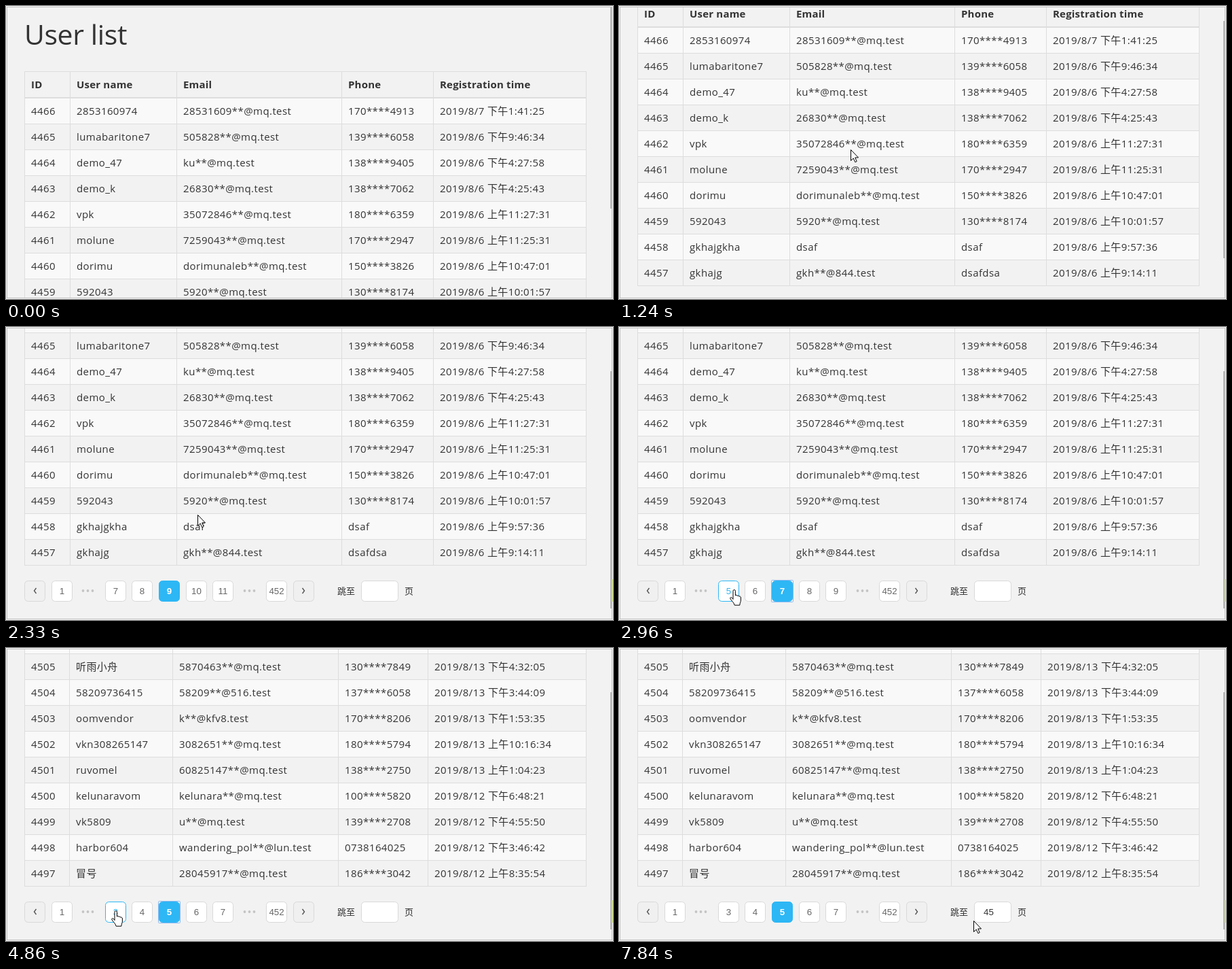
Recreate the animation shown at these times as an HTML page. Size 894 by 431 pixels, loop 8 s.

```html
<!DOCTYPE html>
<html lang="en">
<head>
<meta charset="utf-8">
<title>User list</title>
<style>
  html, body { margin: 0; width: 100%; height: 100%; overflow: hidden; background: #f2f2f2; }
  svg { display: block; width: 894px; height: 431px; }
  text { fill: #333; white-space: pre; }
  .title { font: 400 41px "Open Sans", "Noto Sans", sans-serif; letter-spacing: -.4px; }
  .cell { font: 15px "Open Sans", "Noto Sans", "Noto Sans CJK SC", "Noto Sans CJK", sans-serif; letter-spacing: .4px; }
  .head { font-weight: 700; letter-spacing: .2px; }
  .page { font: 13.33px "Liberation Sans", Arial, sans-serif; fill: #666; text-anchor: middle; }
  .label { font: 13px "Noto Sans CJK SC", "Noto Sans CJK", sans-serif; }
  .typed { font: 13.33px "Liberation Sans", Arial, sans-serif; }
  .pointer path { fill: #fff; stroke: #000; stroke-linejoin: round; }
</style>
</head>
<body>
<svg viewBox="0 0 894 431">
  <rect width="894" height="431" fill="#f2f2f2"/>
  <g id="content">
    <text class="title" x="27" y="57">User list</text>
    <g id="tables"></g>
    <g id="pager"></g>
  </g>
  <rect id="thumb" x="890" width="3" height="349" fill="#b4b4b4"/>
  <g fill="none">
    <rect x=".5" y=".5" width="893" height="430" stroke="#fafafa"/>
    <rect x="1.5" y="1.5" width="891" height="428" stroke="#c0c0c0"/>
  </g>
  <rect id="strip" x="892" width="2" height="33" fill="#d3e092"/>
  <g id="cursor" class="pointer">
    <path id="arrow" d="M.5 .5V16.5L4.2 13L6.8 18.7L9.2 17.6L6.7 12H11.5Z"/>
    <path id="hand" transform="translate(-6 0)" d="M5 14.5V2.3a1.7 1.7 0 0 1 3.4 0V9c.6-1.2 2.6-1 2.8.6c.8-1 2.4-.6 2.6.8c.9-.7 2.6-.2 2.6 1.6V16c0 2.5-1.4 3.5-1.6 7.2H7.2C6.6 19.8 3 17 1 13.8c-.9-1.6 1-2.8 2.2-1.6z"/>
    <path id="beam" style="fill:none;stroke:#333" d="M-2.5-7.5H-1L.5-6.5L2-7.5H3.5M.5-6.5V6.5M-2.5 7.5H-1L.5 6.5L2 7.5H3.5"/>
  </g>
</svg>
<script>
const LOOP = 8000, ROW = 38, BLUE = '#2db7f5', LINE = '#ddd';
const $ = id => document.getElementById(id);
const HEADINGS = ['ID', 'User name', 'Email', 'Phone', 'Registration time'];
const WIDE = [27, 94, 251, 494, 629, 854], NARROW = [27, 93, 245, 489, 621, 854];

// Each row: name, email, phone, time. An empty row stays above the visible area.
const tables = [
  { firstId: 4466, edges: WIDE, rows: [
    '2853160974,28531609**@mq.test,170****4913,8/7 下午1:41:25',
    'lumabaritone7,505828**@mq.test,139****6058,8/6 下午9:46:34',
    'demo_47,ku**@mq.test,138****9405,8/6 下午4:27:58',
    'demo_k,26830**@mq.test,138****7062,8/6 下午4:25:43',
    'vpk,35072846**@mq.test,180****6359,8/6 上午11:27:31',
    'molune,7259043**@mq.test,170****2947,8/6 上午11:25:31',
    'dorimu,dorimunaleb**@mq.test,150****3826,8/6 上午10:47:01',
    '592043,5920**@mq.test,130****8174,8/6 上午10:01:57',
    'gkhajgkha,dsaf,dsaf,8/6 上午9:57:36',
    'gkhajg,gkh**@844.test,dsafdsa,8/6 上午9:14:11'] },
  { firstId: 4486, edges: WIDE, rows: ['',
    'pelor308,6402718**@mq.test,137****5204,8/10 下午5:20:46',
    'nuvo_61,nuv**@mq.test,158****6017,8/10 下午3:08:12',
    '7302958416,73029584**@mq.test,133****9471,8/10 下午1:36:50',
    'kelimar,902641**@mq.test,181****3850,8/9 下午8:15:27',
    'tosuba92,tosub**@mq.test,139****7246,8/9 下午4:51:03',
    'ruvane,5086273**@mq.test,150****1638,8/9 上午11:42:19',
    'fomilo,38150**@mq.test,176****0925,8/8 下午6:33:08',
    'zedaku5,zeda**@mq.test,132****4780,8/8 下午2:05:41',
    'bonari,7194036**@mq.test,185****2369,8/8 上午9:27:34'] },
  { firstId: 4506, edges: NARROW, rows: ['',
    '听雨小舟,5870463**@mq.test,130****7849,8/13 下午4:32:05',
    '58209736415,58209**@516.test,137****6058,8/13 下午3:44:09',
    'oomvendor,k**@kfv8.test,170****8206,8/13 下午1:53:35',
    'vkn308265147,3082651**@mq.test,180****5794,8/13 上午10:16:34',
    'ruvomel,60825147**@mq.test,138****2750,8/13 上午1:04:23',
    'kelunaravom,kelunara**@mq.test,100****5820,8/12 下午6:48:21',
    'vk5809,u**@mq.test,139****2708,8/12 下午4:55:50',
    'harbor604,wandering_pol**@lun.test,0738164025,8/12 下午3:46:42',
    '冒号,28045917**@mq.test,186****3042,8/12 上午8:35:54'] }
];

const rect = (x, y, w, h, fill, extra = '') =>
  `<rect x="${x}" y="${y}" width="${w}" height="${h}" fill="${fill}" ${extra}/>`;
const text = (x, y, cls, value, extra = '') =>
  `<text x="${x}" y="${y}" class="${cls}" ${extra}>${value}</text>`;

function tableMarkup({ firstId, edges, rows }) {
  const cells = (values, y, cls) => values.map((v, i) => text(edges[i] + 10, y, cls, v)).join('');
  let out = cells(HEADINGS, 121, 'cell head');
  rows.forEach((row, i) => {
    const top = 136 + ROW * i;
    if (i % 2 === 0) out += rect(27, top, 827, 37, '#f9f9f9');
    out += rect(27, top + 37, 828, 1, LINE);
    if (!row) return;
    const [name, email, phone, time] = row.split(',');
    out += cells([firstId - i, name, email, phone, '2019/' + time], top + 24, 'cell');
  });
  out += rect(27, 96, 828, 1, LINE) + rect(27, 134, 828, 2, LINE);
  return out + edges.map(x => rect(x, 96, 1, 420, LINE)).join('');
}

const PAGER_TOP = 538, SIZE = 30;
const slotX = i => Math.round(27 + 39.6 * i);

function pagerMarkup(current, hovered, focused, input) {
  const slots = ['‹', 1, '…', -2, -1, 0, 1, 2, '…', 452, '›'];
  let out = '';
  slots.forEach((slot, i) => {
    const x = slotX(i), mid = x + 15.5, midY = PAGER_TOP + 15;
    if (slot === '…') {
      for (const dx of [-7, 0, 7]) out += `<circle cx="${mid - 1 + dx}" cy="${midY}" r="1.9" fill="#c4c4c4"/>`;
      return;
    }
    const inner = i >= 3 && i <= 7, active = i === 5, arrow = i === 0 || i === 10;
    const fill = active ? BLUE : arrow ? '#f0f0f0' : '#fff';
    const border = active || i === hovered ? BLUE : '#d9d9d9';
    out += rect(x + .5, PAGER_TOP + .5, SIZE, SIZE, fill, `rx="5" stroke="${border}"`);
    if (i === focused) out += rect(x - .5, PAGER_TOP - .5, SIZE + 2, SIZE + 2, 'none', 'rx="1" stroke="#8ab8f0"');
    if (arrow) {
      const d = i ? 2 : -2;
      out += `<path d="M${mid - d} ${midY - 4}L${mid + d / 2} ${midY}L${mid - d} ${midY + 4}" fill="none" stroke="#555" stroke-width="1.4"/>`;
    } else {
      const style = active ? 'style="fill:#fff;font-weight:700"' : i === hovered ? `style="fill:${BLUE}"` : '';
      out += text(mid, PAGER_TOP + 20, 'page', inner ? current + slot : slot, style);
    }
  });
  out += text(488, PAGER_TOP + 20, 'label', '跳至') + text(587, PAGER_TOP + 20, 'label', '页');
  out += rect(523.5, PAGER_TOP + .5, 54, SIZE, '#fff', `rx="5" stroke="${input.focus ? BLUE : '#d9d9d9'}"`);
  out += text(537, PAGER_TOP + 20, 'typed', input.value);
  if (input.caret) out += rect(537 + Math.round(7.4 * input.value.length), PAGER_TOP + 8, 1, 15, '#333');
  return out;
}

const moves = [
  [220, 530, 5, 145, 364, 341, 211],
  [2090, 2810, 10, 338, 221, 169, 386],
  [3120, 3360, 4, 170, 394, 172, 412],
  [3590, 3590, 1, 173, 412, 173, 412],
  [4140, 4620, 7, 172, 409, 161, 386],
  [4940, 5100, 3, 205, 408, 300, 406],
  [5330, 5570, 4, 340, 412, 540, 410],
  [5650, 5810, 3, 545, 404, 560, 388],
  [7290, 7530, 4, 500, 405, 363, 407],
  [7600, 7840, 4, 390, 407, 522, 401]
];
const scrolls = [[0, 0], [1080, 2], [1170, 50], [1240, 104], [1310, 146], [1390, 165]];
const pages = [[0, 9], [2960, 7], [4780, 5]];
const shownTables = [[0, 0], [3120, 1], [4860, 2]];
const focusedSlots = [[0, -1], [2810, 3], [2960, 5], [4620, 3], [4780, 5], [5810, -1]];
const typed = [[0, ''], [6670, '4'], [6980, '45']];

const held = (keys, t) => keys.findLast(([start]) => start <= t)[1];

function pointerAt(t) {
  const move = moves.findLast(m => m[0] <= t);
  if (!move) return null;
  const [start, end, steps, x0, y0, x1, y1] = move;
  const raw = end > start ? Math.min(1, (t - start) / (end - start)) : 1;
  const p = steps > 1 ? Math.floor(raw * (steps - 1) + 1e-6) / (steps - 1) : 1;
  return { x: x0 + (x1 - x0) * p, y: y0 + (y1 - y0) * p };
}

$('tables').innerHTML = tables.map(t => `<g>${tableMarkup(t)}</g>`).join('');
const tableGroups = [...$('tables').children];
const show = (el, on) => { el.style.display = on ? '' : 'none'; };
let lastPager = '';

function draw(t) {
  const scroll = held(scrolls, t), pointer = pointerAt(t);
  $('content').setAttribute('transform', `translate(0 ${-scroll})`);
  $('thumb').setAttribute('y', Math.round(-51 + .705 * scroll));
  $('strip').setAttribute('y', 536 - scroll);
  tableGroups.forEach((g, i) => show(g, i === held(shownTables, t)));

  let hovered = -1, overInput = false;
  show($('cursor'), pointer);
  if (pointer) {
    const { x, y } = pointer, top = PAGER_TOP - scroll;
    if (y >= top && y <= top + 31) {
      hovered = [0, 1, 3, 4, 5, 6, 7, 9, 10].find(i => x >= slotX(i) && x <= slotX(i) + 31) ?? -1;
      overInput = x >= 523 && x <= 578;
    }
    $('cursor').setAttribute('transform', `translate(${Math.round(x)} ${Math.round(y)})`);
    show($('hand'), hovered >= 0);
    show($('beam'), overInput);
    show($('arrow'), hovered < 0 && !overInput);
  }

  const focus = t >= 5810 && t < 7530;
  const input = { focus, value: held(typed, t), caret: focus && !(t >= 6360 && t < 6670) };
  const markup = pagerMarkup(held(pages, t), hovered, held(focusedSlots, t), input);
  if (markup !== lastPager) $('pager').innerHTML = lastPager = markup;
}

const origin = performance.now();
function tick() {
  draw((performance.now() - origin) % LOOP);
  requestAnimationFrame(tick);
}
tick();
</script>
</body>
</html>
```
